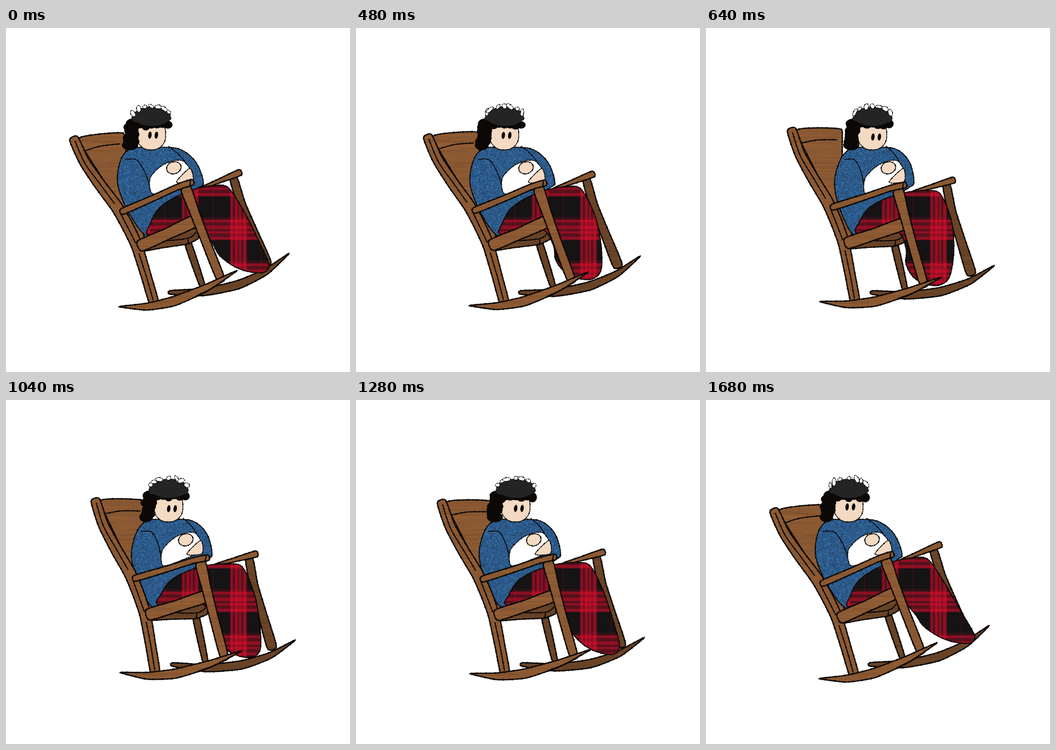
These frames come from a looping animation (748 by 748 pixels, 1840 ms). An HTML page with a canvas:

```html
<!DOCTYPE html>
<html lang="en">
<head>
<meta charset="utf-8">
<title>Rocking chair</title>
<style>
  html, body { margin: 0; width: 100%; height: 100%; overflow: hidden; background: #fff; }
  canvas { display: block; width: 100vw; height: 100vh; object-fit: contain; }
</style>
</head>
<body>
<canvas width="748" height="748"></canvas>
<script>
const canvas = document.querySelector('canvas');
const ctx = canvas.getContext('2d');
const LOOP = 1840, INK = '#0b0806', SKIN = '#f4dac3';

// When each drawing appears, and how far the person bends forward in it.
const starts = [0, 240, 480, 640, 960, 1040, 1280, 1440, 1680];
const bends = [.18, 0, .3, 1, .92, .85, .74, .25, .08];
const leanAt = i => 1 / (1 + Math.exp(3 * (Math.abs(i - 4.5) - 2)));
const tuckAt = i => .5 - .5 * Math.cos(2 * Math.PI * (i - 7.7) / starts.length);

function seeded(seed) {
  return () => {
    seed = (seed * 1664525 + 1013904223) >>> 0;
    return seed / 4294967296;
  };
}

// ---- wood and fabrics ----
function tile(width, height, base, paintTile) {
  const c = document.createElement('canvas');
  c.width = width;
  c.height = height;
  const g = c.getContext('2d');
  g.fillStyle = base;
  g.fillRect(0, 0, width, height);
  paintTile(g, seeded(7));
  return ctx.createPattern(c, 'repeat');
}

const woodTile = light => tile(240, 180, `hsl(26 46% ${light}%)`, (g, rand) => {
  for (let i = 0; i < 200; i++) {
    g.fillStyle = `hsl(26 47% ${light - 6 + rand() * 13}% / .35)`;
    const x = rand() * 240, y = rand() * 180, w = 40 + rand() * 110, h = 1 + rand() * 3;
    g.fillRect(x, y, w, h);
    g.fillRect(x - 240, y, w, h);
  }
});
const wood = woodTile(37), darkWood = woodTile(28);

const denim = tile(160, 160, '#2c5a8a', (g, rand) => {
  for (let i = 0; i < 6000; i++) {
    g.fillStyle = `hsl(210 50% ${21 + rand() * 32}% / .6)`;
    g.fillRect(rand() * 160, rand() * 160, 1 + rand() * 2, 1 + rand() * 2);
  }
});

const plaid = tile(105, 95, '#151314', g => {
  const band = (at, size, alpha) => {
    g.fillStyle = `rgb(232 14 46 / ${alpha})`;
    g.fillRect(at, 0, size, 95);
    g.fillRect(0, at * 1.35, 105, size * 1.2);
  };
  band(0, 37, .3);
  for (let i = 0; i < 4; i++) band(i * 9 + 2, i % 2 ? 6 : 4, .4);
  band(68, 1, .3);
});
plaid.setTransform(new DOMMatrix().translate(487, 415));

// ---- drawing helpers ----
const points = text => text.split(' ').map(p => p.split(',').map(Number));

function trace(pts, closed, curve) {
  const path = new Path2D(), n = pts.length;
  const at = i => closed ? pts[(i + n) % n] : pts[Math.max(0, Math.min(n - 1, i))];
  path.moveTo(...pts[0]);
  for (let i = 0; i < (closed ? n : n - 1); i++) {
    const [p, q, r, s] = [at(i - 1), at(i), at(i + 1), at(i + 2)];
    path.bezierCurveTo(
      q[0] + (r[0] - p[0]) * curve, q[1] + (r[1] - p[1]) * curve,
      r[0] - (s[0] - q[0]) * curve, r[1] - (s[1] - q[1]) * curve, ...r);
  }
  if (closed) path.closePath();
  return path;
}

// Solid line with a broken, wider pass for a crayon edge.
function crayon(path, width) {
  ctx.strokeStyle = INK;
  ctx.lineWidth = width;
  ctx.stroke(path);
  ctx.lineWidth = width + 1.2;
  ctx.setLineDash([2, 3, 1, 2, 4, 3, 1, 4]);
  ctx.stroke(path);
  ctx.setLineDash([]);
}

function paint(path, fill, width) {
  ctx.fillStyle = fill;
  ctx.fill(path);
  if (width) crayon(path, width);
}

function oval(x, y, rx, ry, fill, width = 0, turn = 0) {
  const path = new Path2D();
  path.ellipse(x, y, rx, ry, turn, 0, 7);
  paint(path, fill, width);
}

// Parts are drawn through a function that moves each of their points.
const area = (fill, width, curve, text) => {
  const pts = points(text);
  return move => paint(trace(pts.map(move), true, curve), fill, width);
};

const line = (width, text) => {
  const pts = points(text);
  return move => crayon(trace(pts.map(move), false, .16), width);
};

// A plank along a centre line, from one width to another, thicker midway by bulge.
function beam(fill, text, from, to, bulge = 0) {
  const mid = points(text), last = mid.length - 1;
  const side = sign => mid.map(([x, y], i) => {
    const [ax, ay] = mid[Math.max(0, i - 1)], [bx, by] = mid[Math.min(last, i + 1)];
    const s = i / last, length = Math.hypot(bx - ax, by - ay);
    const half = sign * (from + (to - from) * s + bulge * Math.sin(Math.PI * s)) / 2;
    return [x - (by - ay) / length * half, y + (bx - ax) / length * half];
  });
  const pts = [...side(1), ...side(-1).reverse()];
  return move => paint(trace(pts.map(move), true, .1), fill, 2.4);
}

// The chair and legs tilt as one around the foot of the back post.
const rock = lean => ([x, y]) => {
  const dx = x - 324, dy = y - 596, c = Math.cos(.122 * lean), s = Math.sin(.122 * lean);
  return [324 + dx * c - dy * s + 3 * lean, 596 + dx * s + dy * c - 4 * lean];
};

// The upper body slides forward, most at the head.
const sway = bend => ([x, y]) =>
  [x + bend * (55 - .15 * (y - 260) - .09 * (x - 250)), y];

// The feet swing in under the seat.
const swing = tuck => ([x, y]) => {
  const drop = Math.max(0, y - 350);
  return [x - tuck * drop * drop * .0025, y + tuck * drop * .1];
};

// ---- chair ----
const chairBehind = [
  area(wood, 2.4, .05, '157,243 200,231 256,229 264,300 300,452 286,462 250,390'),
  line(2, '172,267 205,257 248,252'),
  beam(darkWood, '358,575 430,574 505,558 565,530 612,493', 8, 2, 13),
  beam(darkWood, '495,328 512,383 538,444 567,512', 16, 20),
  beam(wood, '426,348 465,332 509,314', 5, 13),
  beam(darkWood, '396,469 427,560', 14, 11),
  area(darkWood, 2.2, .03, '294,486 416,432 418,458 395,470 340,478'),
  line(2, '335,464 396,457 414,443'),
  line(2, '396,457 396,470')
];

const chairFront = [
  beam(wood, '147,240 170,290 204,340 240,388 264,430 285,475 305,540 323,601', 19, 19, 6),
  line(2, '150,246 172,295 205,340 236,382'),
  line(2, '250,405 268,440 282,468'),
  line(2, '289,490 305,540 320,592'),
  beam(wood, '291,474 350,448 409,420', 24, 25),
  beam(wood, '391,349 409,398 432,458 467,546', 22, 17),
  beam(wood, '253,399 320,370 375,345 406,335', 13, 12),
  line(2.2, '401,332 400,343'),
  beam(wood, '250,606 305,606 365,594 435,565 498,530', 2, 2, 18),
  line(1.8, '415,582 455,562 480,543')
];

// ---- person ----
const torso = [
  area(denim, 1.8, .16,
    '262,262 240,287 235,340 262,403 305,452 340,400 410,350 424,335 405,290 365,262 300,260'),
  line(1.5, '250,286 275,287 295,315 308,350'),
  line(1.5, '345,257 365,272 382,290'),
  area('#fff', 1.2, .14, '312,360 306,327 330,300 360,288 382,292 400,325 350,350'),
  area(SKIN, 1.3, .14, '365,335 390,307 398,311 400,334')
];
const thigh = points('312,450 314,425 330,395 360,372 405,352 450,343 483,347');
const calf = points('520,400 555,460 584,510 576,528 540,526 505,513 472,490 452,462 412,430');

function drawHead(bend, seed) {
  const rand = seeded(seed * 977 + 31);
  const wobble = size => (rand() - .5) * size;
  ctx.save();
  ctx.translate(306 + 56 * bend, 234);
  const face = new Path2D();
  face.roundRect(-32, -36, 63, 67, 29);
  paint(face, SKIN, 1.3);
  for (const x of [-4, 10]) oval(x + 5 * bend, -2 + 5 * bend, 3.7, 7.8, INK, 0, .12);

  for (let i = 0; i < 7; i++) {
    oval(-40 - i * 1.2 + wobble(5), -26 + i * 7.8, 16 + wobble(4), 11, INK);
    oval(-36 + i * 12, -24 + wobble(5), 10, 9 + wobble(4), INK);
  }
  oval(1, -42, 41, 21, '#242424');
  for (let i = 0; i < 8; i++) {
    const angle = Math.PI * (.95 + i * 1.1 / 7);
    oval(Math.cos(angle) * 34, -40 + Math.sin(angle) * 14, 10, 8 + wobble(5), '#242424');
  }
  for (let i = 0; i < 7; i++) {
    const angle = Math.PI * (1.12 + i * .125) + wobble(.2);
    oval(Math.cos(angle) * 42, -41 + Math.sin(angle) * 23,
      4 + rand() * 5, 3 + rand() * 2, '#fff', .8, angle + 1.5 + wobble(2));
  }
  ctx.restore();
}

function draw(index) {
  const bend = bends[index], tilt = rock(leanAt(index)), slide = sway(bend);
  ctx.fillStyle = '#fff';
  ctx.fillRect(0, 0, 748, 748);
  chairBehind.forEach(part => part(tilt));
  torso.forEach(part => part(slide));
  oval(...slide([358, 304]), 16, 13, SKIN, 1.5, -.3);
  drawHead(bend, index);
  const legs = [...thigh, ...calf.map(swing(tuckAt(index)))].map(tilt);
  paint(trace(legs, true, .15), plaid, 1.8);
  chairFront.forEach(part => part(tilt));
}

ctx.lineJoin = 'round';
let shown = -1;

function tick() {
  const time = performance.now() % LOOP;
  const index = starts.findLastIndex(start => time >= start);
  if (index !== shown) draw(shown = index);
  requestAnimationFrame(tick);
}
tick();
</script>
</body>
</html>
```
